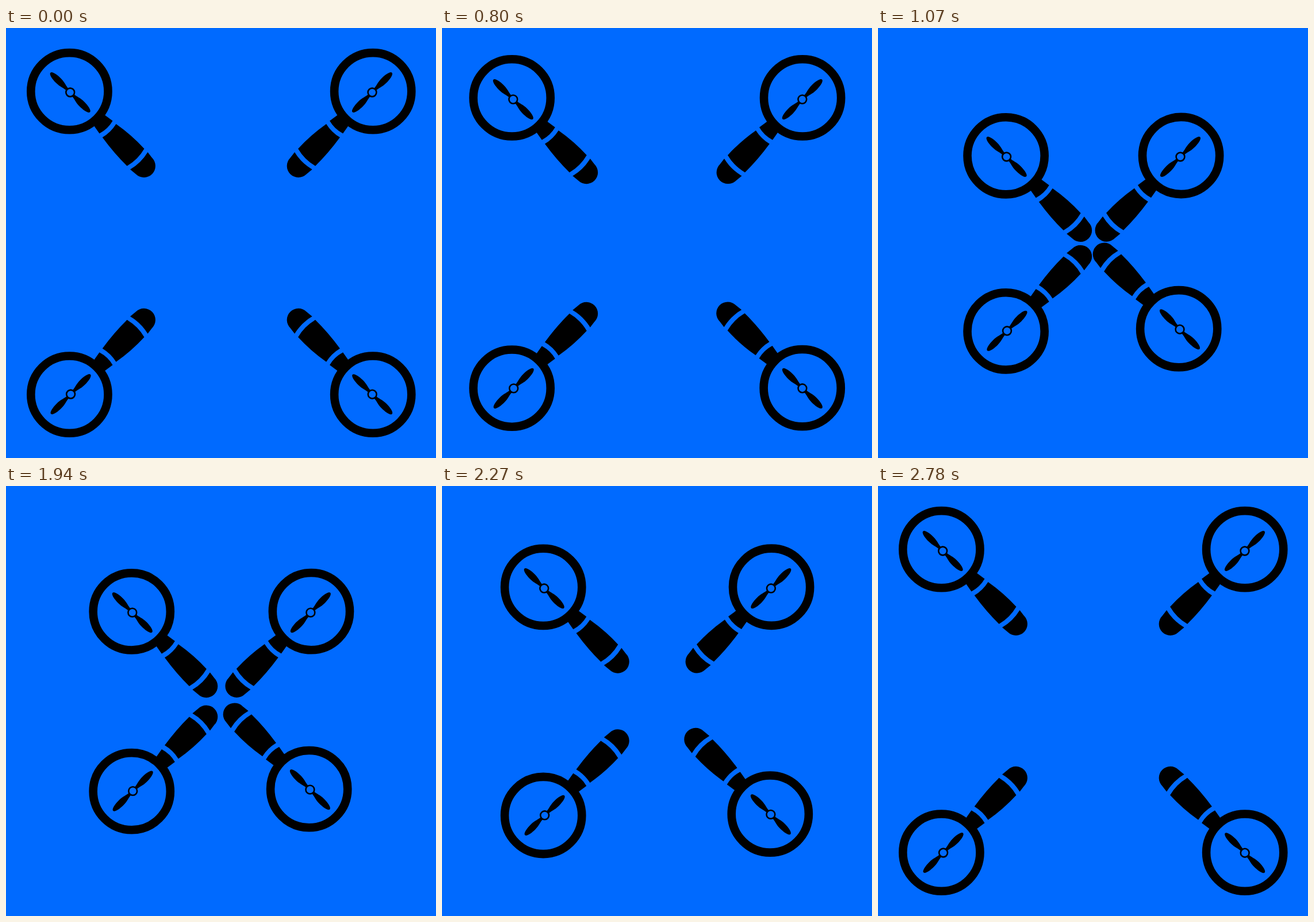
Recreate the animation shown at these times as an HTML page. Size 748 by 748 pixels, loop 2810 ms.

```html
<!DOCTYPE html>
<html lang="en">
<head>
<meta charset="utf-8">
<title>Magnifier quadcopter</title>
<style>
  html, body { margin: 0; width: 100%; height: 100%; overflow: hidden; background: #006aff; }
  svg { display: block; width: 100vw; height: 100vh; }
</style>
</head>
<body>
<svg id="stage" viewBox="0 0 748 748">
  <defs>
    <g id="glass" transform="translate(-110.4 -110.2)">
      <circle cx="110.4" cy="110.2" r="67.1" fill="none" stroke="#000" stroke-width="14.6"/>
      <path d="M157 157L172 151.5L185.5 161.5Q177.5 175.5 162.5 183.5L153 170Z"/>
      <path d="M191.5 167Q218.5 186 240.5 210Q229.5 229 210.5 240Q188 218 167.7 190.3Q182.5 181.5 191.5 167Z"/>
      <path d="M246.5 216L254 225.8A19.9 19.9 0 0 1 226 254.2L216 246Q235 235 246.5 216Z"/>
    </g>
    <path id="blade" d="M6-2.5C14-2.6 18-5.8 29-5.8C38-5.8 48.6-4 48.6 0C48.6 4 38 5.8 29 5.8C18 5.8 14 2.6 6 2.5Z"/>
    <g id="propeller">
      <use href="#blade"/>
      <use href="#blade" transform="rotate(180)"/>
      <circle r="7.4" fill="#006aff" stroke="#000" stroke-width="2.6"/>
    </g>
  </defs>
</svg>
<script>
const LOOP = 2810, STEP = 30;
const SPIN = { start: 30, steps: 20 };
const GATHER = { start: 800, steps: 10 };
const SPREAD = { start: 1940, steps: 29 };

// far/near: lens centre apart and together; hubFar/hubNear: the same for the propeller
const arms = [
  { flip: [1, 1], far: [110.4, 110.2], near: [222.6, 222.3], hubFar: [112.7, 113], hubNear: [223.6, 224], angle: 45, turn: 1 },
  { flip: [-1, 1], far: [638.2, 110.2], near: [527.1, 222], hubFar: [638, 113], hubNear: [526, 224], angle: 135, turn: -1 },
  { flip: [1, -1], far: [110.4, 637.6], near: [222.6, 527.4], hubFar: [113.6, 638], hubNear: [224.5, 526.8], angle: 135, turn: 1 },
  { flip: [-1, -1], far: [638.2, 637.6], near: [523.2, 523.2], hubFar: [638.2, 638.2], hubNear: [525, 524.2], angle: 45, turn: -1 }
];

const stage = document.getElementById('stage');
function place(id) {
  const node = document.createElementNS('http://www.w3.org/2000/svg', 'use');
  node.setAttribute('href', '#' + id);
  return stage.appendChild(node);
}
for (const arm of arms) {
  arm.glass = place('glass');
  arm.propeller = place('propeller');
}

// Share of a phase done at time t, advancing in whole steps
function progress({ start, steps }, t) {
  const done = Math.floor((t - start) / STEP) + 1;
  return Math.min(Math.max(done, 0), steps) / steps;
}
const mix = (a, b, p) => a.map((v, i) => v + (b[i] - v) * p);

function draw(t) {
  const spin = progress(SPIN, t);
  const closeness = progress(GATHER, t) - progress(SPREAD, t);
  const drift = spin - 1;
  for (const { flip, far, near, hubFar, hubNear, angle, turn, glass, propeller } of arms) {
    const lens = mix(far, near, closeness);
    const hub = mix(hubFar, hubNear, closeness).map(v => v + drift);
    glass.setAttribute('transform', `translate(${lens}) scale(${flip})`);
    propeller.setAttribute('transform', `translate(${hub}) rotate(${angle + turn * 360 * spin})`);
  }
}

const began = performance.now();
function tick() {
  draw((performance.now() - began) % LOOP);
  requestAnimationFrame(tick);
}
tick();
</script>
</body>
</html>
```
